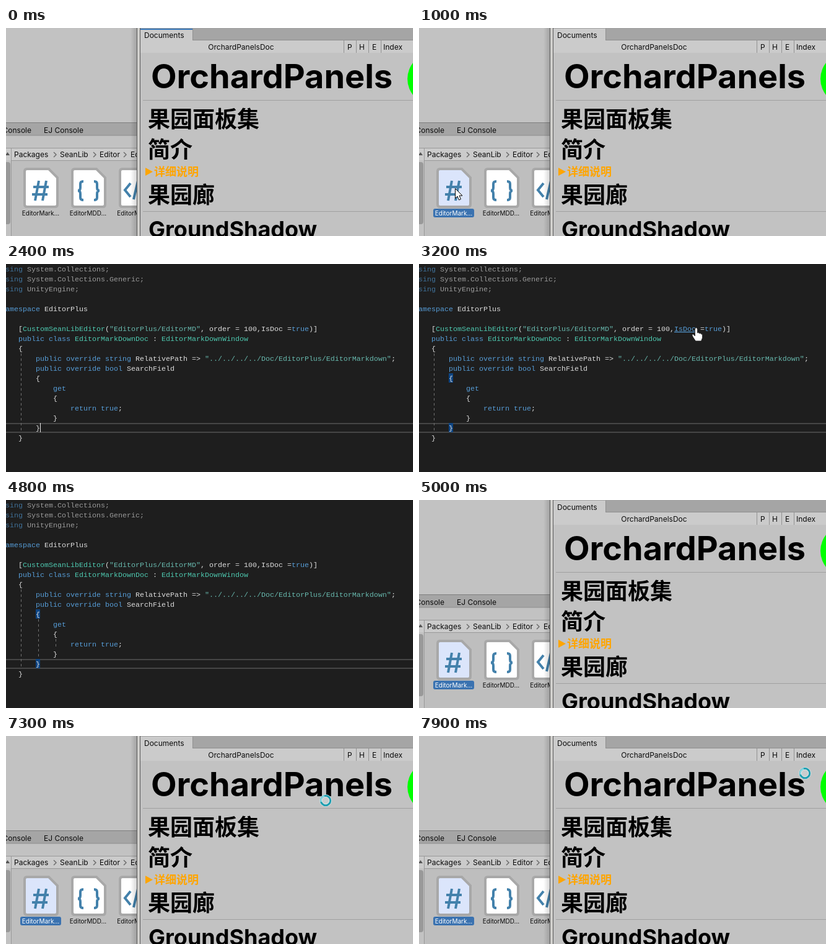
An HTML page for the animation above (8 s loop, 657 px wide and 335 px high).

```html
<!DOCTYPE html>
<html lang="en">
<head>
<meta charset="utf-8">
<title>Editor window</title>
<style>
html, body { margin: 0; width: 100%; height: 100%; overflow: hidden; background: #c2c2c2; }
svg { display: block; width: 657px; height: 335px; }
text { white-space: pre; }
#desk { font: 12px Inter, sans-serif; fill: #0b0b0b; }
#desk .label { font-size: 10px; text-anchor: middle; }
#desk .big { font: bold 36px Inter, "Noto Sans CJK SC", "Noto Sans CJK", sans-serif; fill: #000; }
#code { font: 11.667px "Liberation Mono", monospace; }
.page { stroke: #a8a8a8; stroke-width: 4; fill: #fff; }
.sign { stroke: #4381ab; stroke-width: 4; fill: none; }
.chevron { stroke: #6e6e6e; stroke-width: 1.5; fill: none; }
.guide { stroke: #707070; stroke-dasharray: 4 4; }
</style>
</head>
<body>
<svg viewBox="0 0 657 335">
  <defs>
    <linearGradient id="shade">
      <stop offset="0" stop-color="#000" stop-opacity="0"/>
      <stop offset="1" stop-color="#000" stop-opacity=".16"/>
    </linearGradient>
    <path id="sheet" d="M34 227H69L83 241V284Q83 288 79 288H34Q30 288 30 284V231Q30 227 34 227Z"/>
    <path id="chev" d="M0-4l4 4-4 4"/>
  </defs>

  <g id="desk">
    <path fill="#c2c2c2" d="M0 0H657V335H0z"/>
    <!-- project browser -->
    <path fill="#a5a5a5" d="M0 153H211V173H0z"/>
    <path fill="#7f7f7f" d="M0 152H211V153H0z"/>
    <path fill="#8f8f8f" d="M0 172.500H211V173.500H0z"/>
    <path fill="#cbcbcb" d="M0 194H211V213H0z"/>
    <path fill="#999" d="M0 193H211V194H0zM9 213H211V214H9zM8 194H9V335H8z"/>
    <path fill="#bebebe" d="M9 214H211V335H9z"/>
    <rect x="-6" y="216" width="13" height="100" rx="4" fill="#999"/>
    <path fill="#555" d="M-1 205L2.500 200 6 205z"/>
    <text x="41" y="169" text-anchor="end">Console</text>
    <text x="61" y="169">EJ Console</text>
    <text x="13" y="208">Packages</text>
    <text x="87" y="208">SeanLib</text>
    <text x="151" y="208">Editor</text>
    <text x="201" y="208">Editor</text>
    <g class="chevron">
      <use href="#chev" x="77" y="204"/><use href="#chev" x="141" y="204"/><use href="#chev" x="190" y="204"/>
    </g>
    <use id="picked" href="#sheet" class="page"/>
    <use href="#sheet" x="77" class="page"/>
    <use href="#sheet" x="154" class="page"/>
    <path class="sign" d="M53 246L47 278M65 246L59 278M44 256H69M42 268H67"/>
    <path class="sign" d="M125 247q-5 0-5 4v6q0 5-4 5q4 0 4 5v6q0 4 5 4M142 247q5 0 5 4v6q0 5 4 5q-4 0-4 5v6q0 4-5 4"/>
    <path class="sign" d="M201 250l-9 11 9 11M213 246l-7 30"/>
    <rect id="chip" x="23" y="291" width="66" height="14" rx="3" fill="#3a72b0"/>
    <text id="name" class="label" x="56" y="302">EditorMark...</text>
    <text class="label" x="132.500" y="302">EditorMDD...</text>
    <text class="label" x="210" y="302">EditorMDW...</text>
    <path fill="url(#shade)" d="M201 0H211V335H201z"/>

    <!-- document window -->
    <path fill="#c2c2c2" d="M211 0H657V335H211z"/>
    <path fill="#5a5a5a" d="M211 0H212V335H211zM216 0H217V335H216z"/>
    <path fill="#d0cfcc" d="M212 0H216V335H212z"/>
    <path fill="#a5a5a5" d="M217 0H657V20H217z"/>
    <path fill="#cbcbcb" d="M217 1H301V20H217zM217 20H657V40H217z"/>
    <path fill="#8f8f8f" d="M301 1H302V20H301zM301 19H657V20H301z"/>
    <path id="focus" fill="#3a79bb" d="M217 1H301V3H217z"/>
    <path fill="#929292" d="M545 20h1v20h-1zM565 20h1v20h-1zM585 20h1v20h-1zM605 20h1v20h-1z"/>
    <path fill="#a0a0a0" d="M221 116H657V117H221zM221 295H657V296H221z"/>
    <text x="223" y="16">Documents</text>
    <text x="379.500" y="35" text-anchor="middle">OrchardPanelsDoc</text>
    <text x="551" y="35">P</text><text x="570" y="35">H</text><text x="591" y="35">E</text>
    <text x="609" y="35">Index</text>
    <text class="big" x="234" y="97" style="font-size:54px">OrchardPanels</text>
    <circle cx="690" cy="82" r="42" fill="#0f0"/>
    <text class="big" x="229" y="160">果园面板集</text>
    <text class="big" x="229" y="209">简介</text>
    <path fill="#ffa500" d="M225 225L237 231.500 225 238z"/>
    <text class="big" x="239" y="238" style="font-size:18px;fill:#ffa500">详细说明</text>
    <text class="big" x="229" y="282">果园廊</text>
    <text class="big" x="230" y="337">GroundShadow</text>
  </g>

  <g id="code">
    <path fill="#1e1e1e" d="M0 0H657V335H0z"/>
    <g id="line" stroke="#464646" stroke-width="2"><path d="M0 1H657M0 15H657"/></g>
    <path id="braces" fill="#0e4583" d="M48 176h7v15h-7zM48 256h7v15h-7z"/>
    <path id="outer" class="guide"/>
    <path id="inner" class="guide" d="M52.500 192V256M80.500 224V240"/>
    <g id="fixed"></g>
    <g id="before"></g>
    <g id="typed"></g>
    <g id="after"></g>
    <g id="link"></g>
    <rect id="caret" width="1" height="15" fill="#e6e6e6"/>
  </g>

  <path id="arrow" fill="#fff" stroke="#000" d="M.5 .5V16.500L4 13 6.500 19 9.500 17.700 7 12H12z"/>
  <path id="beam" fill="none" stroke="#ddd" d="M-4-7.500h3l1 1 1-1h3M-4 7.500h3l1-1 1 1h3M0-6.500V6.500"/>
  <path id="hand" fill="#fff" stroke="#222" stroke-width=".8" d="M-2 1Q0-4 2 1V7Q4 5 5 8Q7 6 8 9Q10 8 10 11V15L8 20H-1L-5 14Q-8 9-5 9L-2 12z"/>
  <g id="busy" fill="none">
    <circle r="9.300" stroke="#d5e6e8" stroke-width="1.400"/>
    <circle r="7.500" stroke="#209eb0" stroke-width="3.400"/>
    <path d="M-7.200 2A7.500 7.500 0 0 1 -2-7.200" stroke="#8ed8e2" stroke-width="2.500"/>
    <circle r="5.800" fill="#c9cdce" stroke="#eef4f4" stroke-width=".8"/>
  </g>
</svg>
<script>
const $ = id => document.getElementById(id);
const show = (id, on) => $(id).style.display = on ? '' : 'none';
const move = (id, x, y) => $(id).setAttribute('transform', `translate(${x} ${y})`);

const colX = col => 7 * col - 8;
const keywords = /^(using|namespace|public|class|override|string|bool|get|return|true)$/;
const types = /^(CustomSeanLibEditor|EditorMarkDownDoc|EditorMarkDownWindow)$/;

function colorOf(word, dim) {
  if (dim) return word === 'using' ? '#3f6f96' : '#9a9a9a';
  if (keywords.test(word)) return '#569cd6';
  if (types.test(word)) return '#4ec9b0';
  return word[0] === '"' ? '#68b9ae' : '#dcdcdc';
}

function codeLine(col, row, source, dim) {
  return [...source.matchAll(/"[^"]*"|\w+|[^\s\w"]+/g)].map(m =>
    `<text x="${colX(col + m.index)}" y="${12 + 16 * row}" fill="${colorOf(m[0], dim)}">${m[0].replace('>', '&gt;')}</text>`
  ).join('');
}
const block = lines => lines.map(l => codeLine(...l)).join('');

$('fixed').innerHTML = block([
  [0, 0, 'using System.Collections;', true],
  [0, 1, 'using System.Collections.Generic;', true],
  [0, 2, 'using UnityEngine;', true],
  [0, 4, 'namespace EditorPlus'],
  [4, 6, '[CustomSeanLibEditor("EditorPlus/EditorMD", order = 100,IsDoc =true)]'],
  [4, 7, 'public class EditorMarkDownDoc : EditorMarkDownWindow'],
  [4, 8, '{'],
  [8, 9, 'public override string RelativePath => "../../../../Doc/EditorPlus/EditorMarkdown";']
]);
$('before').innerHTML = codeLine(4, 11, '}');
$('after').innerHTML = block([
  [8, 10, 'public override bool SearchField'],
  [8, 11, '{'],
  [12, 12, 'get'],
  [12, 13, '{'],
  [16, 14, 'return true;'],
  [12, 15, '}'],
  [8, 16, '}'],
  [4, 17, '}']
]);
$('link').innerHTML = `<path fill="#1e1e1e" d="M412 97h35v14h-35z"/>
  <text x="${colX(60)}" y="108" fill="#569cd6" text-decoration="underline">IsDoc</text>`;

// Pointer routes: [time, x, y]; the pointer is hidden outside its route.
const routes = {
  arrow: [[100, 617, 56], [200, 560, 85], [300, 400, 150], [400, 220, 215], [500, 100, 250], [600, 58, 258], [1400]],
  rest: [[1400, 60.5, 259], [1700]],
  beam: [[2700, 60.5, 259], [2900, 230.5, 195], [3200, 447.5, 104], [3400, 610.5, 58], [3500, 636.5, 46],
    [3600, 648.5, 38], [3800, 633.5, 42], [4000, 633.5, 42], [4200, 622.5, 8], [4300]],
  busy: [[5300, 433, 52], [5800, 490, 112], [7200, 490, 112], [7700, 620, 72], [7800, 620, 72], [7900, 623, 60], [8000]]
};

function along(route, t) {
  const i = route.findIndex(p => p[0] > t);
  if (i < 1) return null;
  const [t0, x, y] = route[i - 1], [t1, x1 = x, y1 = y] = route[i];
  const k = (t - t0) / (t1 - t0);
  return [x + (x1 - x) * k, y + (y1 - y) * k];
}

function place(id, pos) {
  show(id, pos);
  if (pos) move(id, ...pos);
}

function draw(t) {
  const coding = t >= 1400 && t < 5000;
  const selected = t >= 900, done = t >= 2400, linked = t === 3200;
  show('desk', !coding);
  show('code', coding);
  show('focus', !selected);
  show('chip', selected);
  $('picked').style.fill = selected ? '#dbe5fb' : '';
  $('name').style.fill = selected ? '#fff' : '';

  const phrase = 'public override ';
  const count = t < 1700 ? 0 : Math.min(16, Math.round(((t - 1600) / 500) * 16));
  $('typed').innerHTML = codeLine(5, 10, phrase.slice(0, count));
  show('typed', !done);
  show('before', !done);
  show('after', done);
  show('braces', t >= 2500);
  show('inner', t >= 3600);
  show('link', linked);
  $('outer').setAttribute('d', `M24.500 144V${done ? 272 : 176}`);
  move('line', 0, done ? 256 : 160);
  move('caret', done ? 55 : colX(5 + count), done ? 256 : 160);
  show('caret', t < 3000 || (t >= 3600 && t < 4800));

  const beam = along(routes.rest, t) || along(routes.beam, t);
  place('arrow', along(routes.arrow, t));
  place('beam', linked ? null : beam);
  place('hand', linked ? beam : null);
  place('busy', along(routes.busy, t));
}

const start = performance.now();
function tick() {
  // The screen is refreshed ten times a second.
  draw(Math.floor((performance.now() - start) % 8000 / 100) * 100);
  requestAnimationFrame(tick);
}
tick();
</script>
</body>
</html>
```
